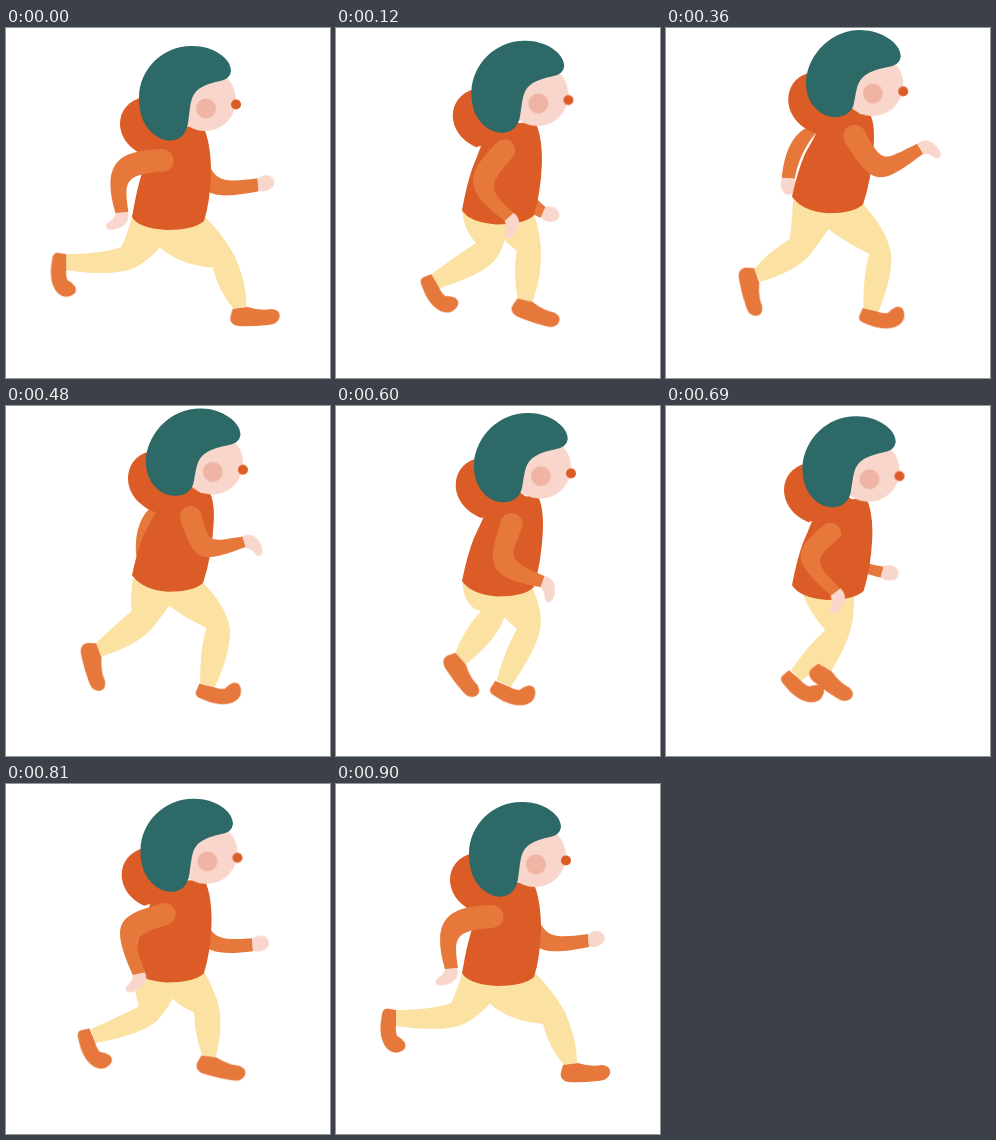
Recreate the animation shown at these times as an HTML page without scripts. Size 324x350 px, loop 930 ms.

```html
<!DOCTYPE html>
<html lang="en">
<head>
<meta charset="utf-8">
<title>Running girl</title>
<style>
html, body { margin: 0; width: 100%; height: 100%; overflow: hidden; background: #fff; }
svg { display: block; width: 324px; height: 350px; }
svg * { animation: 930ms linear infinite; }

.coat { fill: #db5c26; }
.sleeve { fill: #e5783a; }
.skin { fill: #f9d6cb; }
.cheek { fill: #efb4a4; }
.hair { fill: #2c6967; animation-name: hair; }
.trousers { fill: #fbe2a2; }

.hood { animation-name: hood; }
.torso { animation-name: torso; }
.face { animation-name: face; transform-origin: 200px 80px; }
.near-arm { animation-name: near-arm; }
.near-hand { animation-name: near-hand; }
.far-arm { animation-name: far-arm; }
.far-hand { animation-name: far-hand; }
.leg-a { animation-name: leg-a; }
.leg-b { animation-name: leg-b; }
.shoe-a { animation-name: shoe-a; }
.shoe-b { animation-name: shoe-b; }

/* Head and trunk rise to the top of the stride, then sink back. */
@keyframes hair {
  0%, 96.77%, 100% { d: path("M133 70C133 40 158 17 187 18C207 18 225 30 225 43Q224 51 214 53C182 60 186 70 182 95C179 115 160 118 145 104Q133 92 133 70Z"); }
  44.09% { d: path("M141 50C144 22 169 -1 197 0C217 0 237 14 236 27Q235 35 223 37C191 43 193 54 189 71C187 89 162 90 151 78Q140 68 141 50Z"); }
}
@keyframes face {
  0%, 96.77%, 100% { transform: translate(0, 0) rotate(0deg); }
  44.09% { transform: translate(8px, -17px) rotate(4deg); }
}
@keyframes hood {
  0%, 96.77%, 100% { d: path("M138 69C107 75 106 112 135 126L190 110Z"); }
  44.09% { d: path("M142 42C117 50 114 89 152 103L201 87Z"); }
}
@keyframes torso {
  0%, 96.77%, 100% { d: path("M197 98Q205 115 205 145Q204 175 198 193Q188 202 160 202Q132 200 126 189Q131 160 136 145Q143 125 150 100Z"); }
  44.09% { d: path("M204 83Q210 92 208 114Q206 147 197 174Q188 183 162 183Q137 181 126 166Q131 143 139 124Q148 110 156 94Z"); }
}

/* Arms: one side to the wrist, back along the other side. */
@keyframes near-arm {
  0%, 96.77%, 100% { d: path("M157 121C118 122 93 130 109 185L122 184C117 152 120 147 155 144A11 11 0 0 0 157 121Z"); }
  12.9% { d: path("M160 115C135 142 120 158 168 193L177 185C150 160 152 158 177 129A11 11 0 0 0 160 115Z"); }
  25.81% { d: path("M168 114C169 155 172 171 227 166L228 154C193 154 190 152 191 113A11 11 0 0 0 168 114Z"); }
  38.71% { d: path("M179 114C207 160 215 158 257 126L251 116C218 132 217 138 198 102A11 11 0 0 0 179 114Z"); }
  44.09% { d: path("M180 110C210 154 216 152 260 117L253 107C221 127 220 130 199 98A11 11 0 0 0 180 110Z"); }
  64.52% { d: path("M164 118C153 155 148 172 205 181L209 170C166 152 177 150 187 119A11 11 0 0 0 164 118Z"); }
  80.65% { d: path("M156 118C110 138 109 142 139 195L151 190C131 155 133 154 167 138A11 11 0 0 0 156 118Z"); }
}
@keyframes near-hand {
  0%, 96.77%, 100% { transform: translate(115.5px, 184.5px) rotate(90deg); }
  12.9% { transform: translate(172.5px, 189px) rotate(49deg); }
  25.81% { transform: translate(227.5px, 160px) rotate(0deg); }
  38.71% { transform: translate(254px, 121px) rotate(-24deg); }
  44.09% { transform: translate(256.5px, 112px) rotate(-29deg); }
  64.52% { transform: translate(207px, 175.5px) rotate(27deg); }
  80.65% { transform: translate(145px, 192.5px) rotate(71deg); }
}
@keyframes far-arm {
  0%, 96.77%, 100% { d: path("M195 115C208 152 209 156 252 150L253 163C208 172 196 168 185 140Z"); }
  12.9% { d: path("M190 130C190 155 195 168 210 179L205 190C185 183 178 160 175 140Z"); }
  25.81% { d: path("M165 110C165 140 165 155 172 165L162 172C150 150 148 130 150 110Z"); }
  38.71% { d: path("M150 105C137 120 131 138 129 151L116 150C118 128 125 108 140 100Z"); }
  44.09% { d: path("M147 102C131 114 124 130 118 143L106 140C110 120 118 102 136 96Z"); }
  64.52% { d: path("M170 115C170 145 172 158 180 166L172 174C158 155 155 135 155 115Z"); }
  80.65% { d: path("M195 125C203 155 208 158 242 157L243 170C205 172 196 168 185 140Z"); }
}
@keyframes far-hand {
  0%, 96.77%, 100% { transform: translate(252.5px, 156.5px) rotate(-6deg); }
  12.9% { transform: translate(207.5px, 184.5px) rotate(22deg); }
  25.81% { transform: translate(167px, 168px) rotate(50deg); }
  38.71% { transform: translate(122.5px, 150.5px) rotate(95deg); }
  44.09% { transform: translate(112px, 141.5px) rotate(108deg); }
  64.52% { transform: translate(176px, 169px) rotate(45deg); }
  80.65% { transform: translate(242.5px, 163.5px) rotate(0deg); }
}

/* Legs: hip, knee, ankle down the back, then up the front. */
@keyframes leg-a {
  0%, 96.77%, 100% { d: path("M127 185Q122 205 115 219Q95 226 60 226L60 242Q108 249 128 240Q148 230 165 205Z"); }
  12.9% { d: path("M126 180Q127 202 140 215Q118 229 95 246L103 260Q146 247 158 233Q168 222 172 195Z"); }
  25.81% { d: path("M135 180Q150 200 152 213Q143 232 143 262L156 267Q185 240 192 218Q196 205 195 184Z"); }
  38.71% { d: path("M145 185Q162 205 203 226Q197 246 197 281L212 284Q226 250 225 228Q223 205 197 176Z"); }
  44.09% { d: path("M145 180Q165 204 212 221Q208 244 214 280L229 281Q239 248 235 223Q228 198 197 173Z"); }
  64.52% { d: path("M150 188Q162 207 181 223Q170 243 161 274L175 281Q203 240 205 220Q206 202 197 183Z"); }
  80.65% { d: path("M127 184Q132 208 145 225Q122 239 102 258L109 271Q153 251 165 236Q174 222 180 195Z"); }
}
@keyframes leg-b {
  0%, 96.77%, 100% { d: path("M135 190Q150 235 207 240Q213 264 228 281L241 279Q241 255 229 228Q216 205 198 188Z"); }
  12.9% { d: path("M150 190Q162 208 181 223Q177 245 182 270L197 274Q207 245 205 219Q203 200 198 186Z"); }
  25.81% { d: path("M127 178Q129 207 152 211Q142 228 134 258L148 267Q176 240 185 224Q192 205 190 184Z"); }
  38.71% { d: path("M127 172Q126 195 124 211Q101 225 89 241L95 254Q130 243 143 228Q155 213 170 190Z"); }
  44.09% { d: path("M127 170Q122 190 114 205Q92 222 72 232L76 246Q117 240 133 227Q150 212 168 190Z"); }
  64.52% { d: path("M126 176Q128 202 145 205Q127 224 119 247L130 258Q158 235 166 217Q172 200 174 190Z"); }
  80.65% { d: path("M155 190Q176 210 175 220Q172 240 174 264L188 270Q202 232 200 211Q199 198 197 185Z"); }
}
@keyframes shoe-a {
  0%, 96.77%, 100% { transform: translate(60px, 234px) rotate(90deg); }
  12.9% { transform: translate(99px, 253px) rotate(60deg); }
  25.81% { transform: translate(147px, 265px) rotate(34deg); }
  38.71% { transform: translate(204px, 282px) rotate(13deg); }
  44.09% { transform: translate(221.5px, 280.5px) rotate(8deg); }
  64.52% { transform: translate(167px, 278px) rotate(23deg); }
  80.65% { transform: translate(104.5px, 264px) rotate(53deg); }
}
@keyframes shoe-b {
  0%, 96.77%, 100% { transform: translate(234px, 280px) rotate(0deg); }
  12.9% { transform: translate(189px, 272px) rotate(21deg); }
  25.81% { transform: translate(140px, 261.5px) rotate(47deg); }
  38.71% { transform: translate(91px, 247px) rotate(78deg); }
  44.09% { transform: translate(74px, 239px) rotate(89deg); }
  64.52% { transform: translate(124px, 252px) rotate(56deg); }
  80.65% { transform: translate(181px, 267px) rotate(26deg); }
}
</style>
</head>
<body>
<svg viewBox="0 0 324 350">
  <path class="far-arm sleeve"/>
  <path class="far-hand skin" d="M0-6Q6-10 12-8Q19-3 15 3Q8 9 0 6Z"/>
  <path class="leg-a trousers"/>
  <path class="leg-b trousers"/>
  <path class="shoe-a sleeve" d="M-8 0L8 0Q12 1 18-1C22-9 29-13 33-6Q38 4 28 11Q18 17 3 15L-4 14Q-11 13-9 6Z"/>
  <path class="shoe-b sleeve" d="M-7 1L8-1Q20 3 32 1Q41 2 40 9Q39 16 28 17Q10 19-2 18Q-11 16-9 8Z"/>
  <path class="hood coat"/>
  <path class="torso coat"/>
  <g class="face">
    <circle class="skin" cx="199" cy="72" r="31"/>
    <circle class="cheek" cx="200" cy="80.5" r="10"/>
    <circle class="coat" cx="230" cy="76.5" r="5"/>
  </g>
  <path class="hair"/>
  <path class="near-hand skin" d="M0-6Q9-8 14 0Q19 10 16 15Q12 18 9 13Q7 8 0 6Z"/>
  <path class="near-arm sleeve"/>
</svg>
</body>
</html>
```
